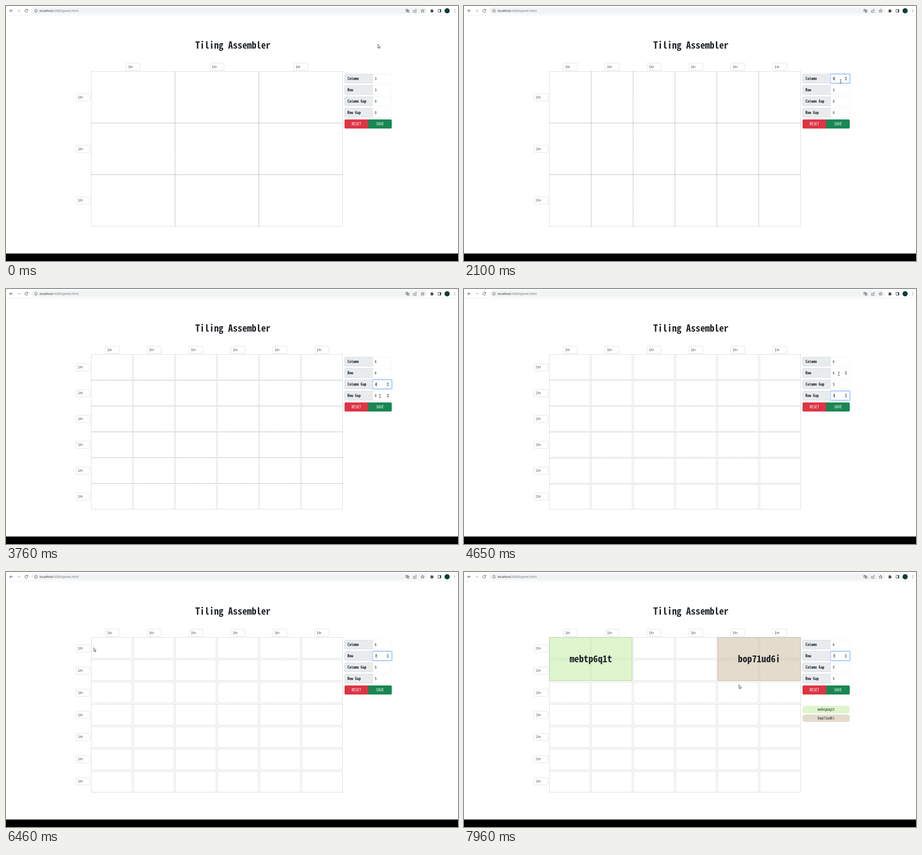
An HTML page for the animation above (7990 ms loop, 996 px wide and 562 px high).

```html
<!DOCTYPE html>
<html lang="en">
<head>
<meta charset="utf-8">
<title>Tiling Assembler</title>
<style>
  html, body { margin: 0; width: 100%; height: 100%; overflow: hidden; background: #fff; }
  svg { display: block; width: 996px; height: 562px; }
  text { font: 8.3px "Noto Sans Mono CJK KR", "Noto Sans Mono CJK JP", "Noto Sans Mono CJK SC", monospace; fill: #212529; white-space: pre; }
  .big { font-size: 20.75px; font-weight: 700; text-anchor: middle; }
  .mid { text-anchor: middle; }
  .label { font-weight: 700; }
  .unit { font-size: 7.26px; }
  .white { fill: #fff; }
  .url { font: 7.1px "Open Sans", "Noto Sans", sans-serif; fill: #6a6e73; }
  .host { fill: #202124; }
  .box { fill: #fff; stroke: #ced4da; stroke-width: .7; }
  .cells { fill: none; stroke: #8c8c8c; stroke-width: .52; stroke-dasharray: 1.556 1.037; }
  .icon { fill: none; stroke: #4a4d51; stroke-width: 1; }
</style>
</head>
<body>
<svg viewBox="0 0 996 562">
  <rect width="996" height="562" fill="#fff"/>
  <g id="toolbar">
    <rect x="56" y="3" width="872" height="14.5" rx="7.2" fill="#f1f3f4"/>
    <path d="M0 20.2H996" stroke="#e4e6e8" stroke-width=".7"/>
    <g class="icon">
      <path d="M15 10.5H8.4M11.4 7.3L8.2 10.5L11.4 13.7"/>
      <path d="M24.6 10.5H31.2M28.2 7.3L31.4 10.5L28.2 13.7" stroke="#bcbfc2"/>
      <path d="M47.4 8.4A3.2 3.2 0 1 0 47.9 11.3M48 6.9V9.4H45.5"/>
      <circle cx="66" cy="10.5" r="3.2" stroke-width=".7"/>
      <path d="M66 10V12.3M66 8.6V9.3" stroke-width=".8"/>
      <path d="M881 7.3H885V12H881ZM884.5 9H888V14H884.5ZM882 9H884M885.5 12.5L887 10.2" stroke-width=".8"/>
      <path d="M899.5 9.5H898V13.8H904V12M900 12C900.3 9.7 901.5 8.8 904.3 8.8M902.5 6.8L904.6 8.8L902.5 10.8" stroke-width=".8"/>
      <path d="M918 6.8L919 9.4L921.7 9.5L919.6 11.2L920.4 13.9L918 12.3L915.6 13.9L916.4 11.2L914.3 9.5L917 9.4Z" stroke-width=".8"/>
      <path d="M952 7.4H958.4V13.6H952Z"/>
    </g>
    <path d="M935.3 8.2H937.2A1.2 1.2 0 0 1 939.6 8.2H941.3V10A1.2 1.2 0 0 1 941.3 12.3V14H935.3V12.3A1.2 1.2 0 0 0 935.3 10ZM956 7.4H958.4V13.6H956Z" fill="#4a4d51"/>
    <circle cx="972" cy="10.5" r="5.7" fill="#0b4038"/>
    <path d="M989 7.2v1.2M989 9.9v1.2M989 12.6v1.2" stroke="#4a4d51" stroke-width="1.2"/>
    <text class="url" x="74" y="13"><tspan class="host">localhost</tspan>:4300/panel.html</text>
  </g>
  <text class="big" x="500" y="93.5">Tiling Assembler</text>
  <g id="grid"></g>
  <g id="areas"></g>
  <g id="fields"></g>
  <path d="M748.5 250H798V270H748.5A2.5 2.5 0 0 1 746 267.5V252.5A2.5 2.5 0 0 1 748.5 250Z" fill="#dc3545"/>
  <path d="M798 250H847.5A2.5 2.5 0 0 1 850 252.5V267.5A2.5 2.5 0 0 1 847.5 270H798Z" fill="#198754"/>
  <text class="mid white" x="772" y="262.9">RESET</text>
  <text class="mid white" x="824" y="262.9">SAVE</text>
  <rect y="545.5" width="996" height="17" fill="#000"/>
  <g id="pointer">
    <path id="arrow" d="M.3 .3V8.6L2.2 6.9L3.5 9.8L4.8 9.2L3.5 6.4H6Z" fill="#fff" stroke="#111" stroke-width=".7"/>
    <path id="beam" d="M-1.8 -3.7H-.5L0 -3.3L.5 -3.7H1.8M0 -3.3V3.3M-1.8 3.7H-.5L0 3.3L.5 3.7H1.8" fill="none" stroke="#222" stroke-width=".8"/>
  </g>
</svg>
<script>
const LOOP = 7990, PX = 996 / 1920;
const GRID = { x: 188, y: 144, w: 553.7, h: 341.6 };
const $ = id => document.getElementById(id);

const fields = [
  { label: 'Column',     y: 160, from: 3, ups: [1540, 1740, 2100] },
  { label: 'Row',        y: 185, from: 3, ups: [2500, 2700, 2910, 5350] },
  { label: 'Column Gap', y: 210, from: 0, ups: [3230, 3410, 3580, 3760, 3940] },
  { label: 'Row Gap',    y: 235, from: 0, ups: [4330, 4490, 4650, 4810, 4970] }
];
const clicks = [[1210, 0], [2340, 1], [3070, 2], [4170, 3], [5150, 1]];
const CARET_OFF = [5850, 6350];

const areas = [
  { at: 6870, col: 0, name: 'mebtp6q1t', fill: '#bdeb9d', edge: '#5f9a48', y: 295 },
  { at: 7800, col: 4, name: 'bop71ud6i', fill: '#c9b79b', edge: '#7d6a4c', y: 313.9 }
];

// time, x, y of the pointer's hot spot
const path = [
  [0, 819, 84], [240, 819, 84], [980, 830, 163], [1540, 830, 163], [1740, 830, 166],
  [2310, 830, 166], [2420, 827, 185], [2700, 827, 185], [2910, 826, 209], [3410, 826, 209],
  [3740, 824, 236], [4340, 824, 236], [4650, 826, 187], [5150, 826, 187], [5530, 238, 218],
  [5710, 154, 188], [5780, 154, 188], [6150, 166, 193], [6570, 208, 161], [6840, 298, 206],
  [6980, 306.5, 210], [7370, 593, 161], [7440, 593, 161], [7650, 687, 221], [7800, 687, 221],
  [7960, 605.5, 248], [LOOP, 605.5, 248]
];

// Monotone cubic: rests where neighbours are equal, flows through the rest.
function along(axis, t) {
  const rate = i => path[i] && path[i + 1] ? (path[i + 1][axis] - path[i][axis]) / (path[i + 1][0] - path[i][0]) : 0;
  const slope = i => {
    const a = rate(i - 1), b = rate(i);
    return a * b > 0 ? 2 * a * b / (a + b) : 0;
  };
  let i = 0;
  while (i < path.length - 2 && t >= path[i + 1][0]) i++;
  const d = path[i + 1][0] - path[i][0], s = (t - path[i][0]) / d, r = 1 - s;
  return path[i][axis] * (1 + 2 * s) * r * r + slope(i) * d * s * r * r
       + path[i + 1][axis] * s * s * (3 - 2 * s) - slope(i + 1) * d * s * s * r;
}

const valueAt = (field, t) => field.from + field.ups.filter(up => up <= t).length;

function outline(x, y, w, h) {
  const e = PX / 2, r = x + w - e, b = y + h - e;
  return `M${x} ${y + e}H${x + w}M${x} ${b}H${x + w}M${x + e} ${y}V${y + h}M${r} ${y}V${y + h}`;
}

const unitBox = (x, y) =>
  `<rect class="box" x="${x}" y="${y}" width="31.1" height="16" rx="1.8"/><text class="unit" x="${x + 4.7}" y="${y + 10.5}">1fr</text>`;

function tracks([cols, rows, gapX, gapY]) {
  const w = (GRID.w - gapX * PX * (cols - 1)) / cols, h = (GRID.h - gapY * PX * (rows - 1)) / rows;
  return { w, h, stepX: w + gapX * PX, stepY: h + gapY * PX };
}

function gridMarkup(values) {
  const [cols, rows] = values, { w, h, stepX, stepY } = tracks(values);
  let d = '', inputs = '';
  for (let c = 0; c < cols; c++) {
    inputs += unitBox(GRID.x + GRID.w * (c + .5) / cols - 15.5, 126);
    for (let r = 0; r < rows; r++) d += outline(GRID.x + c * stepX, GRID.y + r * stepY, w, h);
  }
  for (let r = 0; r < rows; r++) inputs += unitBox(154.2, GRID.y + GRID.h * (r + .5) / rows - 7.8);
  return `<path class="cells" d="${d}"/>${inputs}`;
}

function areaMarkup(area, values) {
  const { w, h, stepX, stepY } = tracks(values);
  const x = GRID.x + area.col * stepX, aw = stepX + w, ah = stepY + h;
  return `<rect x="${x}" y="${GRID.y}" width="${aw}" height="${ah}" fill="${area.fill}" opacity=".5"/>
    <path class="cells" style="stroke:${area.edge}" d="${outline(x, GRID.y, aw, ah)}"/>
    <text class="big" x="${x + aw / 2}" y="199">${area.name}</text>
    <rect x="746" y="${area.y}" width="104" height="16.6" rx="5.5" fill="${area.fill}" opacity=".5"/>
    <text class="mid" x="798" y="${area.y + 11.1}">${area.name}</text>`;
}

$('fields').innerHTML = fields.map(({ label, y }) => `<g>
  <rect class="ring" x="806" y="${y - 12}" width="46" height="24" rx="3.5" fill="#0d6efd"/>
  <rect x="746.3" y="${y - 9.7}" width="103.4" height="19.4" rx="2.4" class="box"/>
  <path d="M808 ${y - 9.7}H748.7A2.4 2.4 0 0 0 746.3 ${y - 7.3}V${y + 7.3}A2.4 2.4 0 0 0 748.7 ${y + 9.7}H808Z" style="fill:#e9ecef" class="box"/>
  <rect class="edge" x="808.2" y="${y - 9.7}" width="41.5" height="19.4" rx="1.5" fill="#fff" stroke="#86b7fe" stroke-width=".8"/>
  <text class="label" x="752.5" y="${y + 2.9}">${label}</text>
  <text class="value" x="812.4" y="${y + 2.9}"></text>
  <path class="caret" d="M816.7 ${y - 4}V${y + 4.5}" stroke="#111" stroke-width=".7"/>
  <g class="spin"><rect x="838.5" y="${y - 5.5}" width="6" height="11" fill="#f1f1f1"/>
  <path d="M839.6 ${y - 1.3}L841.5 ${y - 3.7}L843.4 ${y - 1.3}ZM839.6 ${y + 1.3}L841.5 ${y + 3.7}L843.4 ${y + 1.3}Z" fill="#444"/></g>
</g>`).join('');

const parts = [...$('fields').children].map(g =>
  Object.fromEntries(['ring', 'edge', 'value', 'caret', 'spin'].map(name => [name, g.querySelector('.' + name)])));
const show = (el, on) => el.setAttribute('visibility', on ? 'visible' : 'hidden');

function focusLevel(index, t) {
  let level = 0;
  clicks.forEach(([at, target], n) => {
    if (t < at) return;
    const s = Math.min(1, (t - at) / 150), eased = 1 - (1 - s) ** 2.5;
    if (target === index) level = eased;
    else level = n && clicks[n - 1][1] === index ? 1 - eased : 0;
  });
  return level;
}

let drawn = '';
function draw(t) {
  const values = fields.map(f => valueAt(f, t));
  const live = areas.filter(a => a.at <= t);
  const key = values + '/' + live.length;
  if (key !== drawn) {
    drawn = key;
    $('grid').innerHTML = gridMarkup(values);
    $('areas').innerHTML = live.map(a => areaMarkup(a, values)).join('');
  }

  const x = along(1, t), y = along(2, t);
  const hovered = fields.findIndex(f => x > 808 && x < 850 && Math.abs(y - f.y) < 10);
  const focused = clicks.reduce((now, [at, target]) => t >= at ? target : now, -1);
  const caretOn = t < CARET_OFF[0] || t >= CARET_OFF[1];
  parts.forEach((part, i) => {
    const level = focusLevel(i, t);
    part.ring.setAttribute('opacity', level * .25);
    part.edge.setAttribute('stroke-opacity', level);
    part.value.textContent = values[i];
    show(part.caret, i === focused && caretOn);
    show(part.spin, i === focused || i === hovered);
  });

  $('pointer').setAttribute('transform', `translate(${x} ${y})`);
  show($('arrow'), hovered < 0);
  show($('beam'), hovered >= 0);
}

function tick() {
  draw(performance.now() % LOOP);
  requestAnimationFrame(tick);
}
tick();
</script>
</body>
</html>
```
